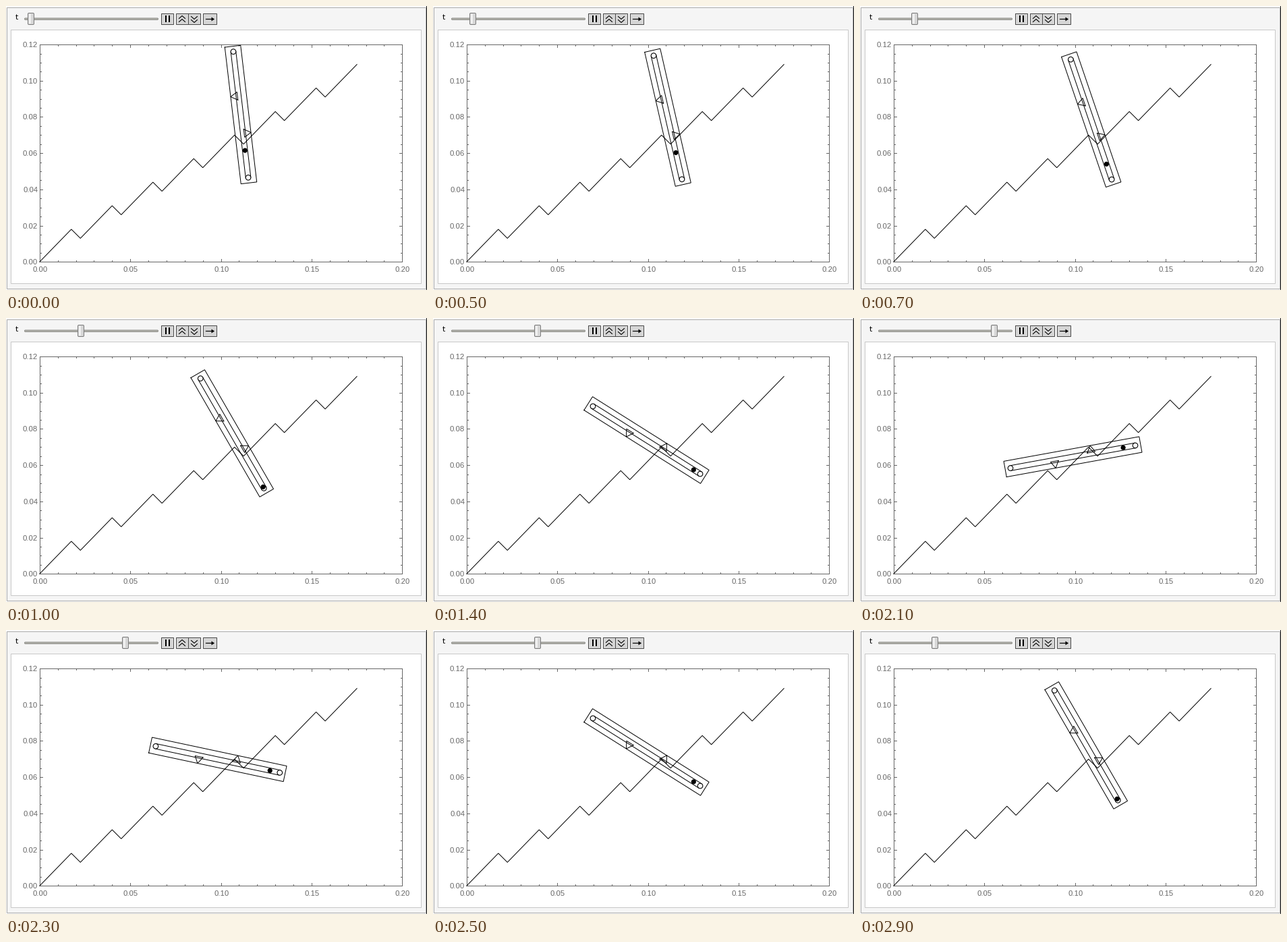
Write a matplotlib script that moves like this. It is 624 px wide and 421 px high and loops after 3 s.

```python
import numpy as np
import matplotlib.pyplot as plt
from matplotlib.animation import FuncAnimation
from matplotlib.patches import Circle, FancyBboxPatch, Polygon, Rectangle

W, H = 624, 421
PX = 0.72  # points per pixel at 100 dpi
GREY = "#666666"

fig = plt.figure(figsize=(W / 100, H / 100), dpi=100, facecolor="white")
ax = fig.add_axes([0, 0, 1, 1])
ax.set_xlim(0, W)
ax.set_ylim(H, 0)
ax.axis("off")


def line(x, y, color="black", width=1, z=3, **kw):
    return ax.plot(x, y, color=color, lw=width * PX, zorder=z,
                   solid_joinstyle="miter", **kw)[0]


def box(x0, y0, x1, y1, fill, edge, z=1):
    ax.add_patch(Rectangle((x0, y0), x1 - x0, y1 - y0, fc=fill, ec=edge,
                           lw=PX, zorder=z))


def rounded(x, y, w, h, r, fill, edge, z):
    patch = FancyBboxPatch((x, y), w, h, fc=fill, ec=edge, lw=PX, zorder=z,
                           boxstyle=f"round,pad=0,rounding_size={r}")
    return ax.add_patch(patch)


def label(x, y, text, ha, size=11.3, color=GREY, font="Liberation Sans"):
    ax.text(x, y, text, ha=ha, va="baseline", fontsize=size * PX,
            color=color, family=font, zorder=4)


def to_px(x, y):
    return 49.8 + 2687.5 * np.asarray(x), 379.3 - 2685 * np.asarray(y)


# Panels
box(1, 2, 622, 419, "#f5f5f5", "#a9a9a9")
line([623, 623], [-1, H + 1], "#202020")
box(7, 35, 615, 411, "white", "#c8c8c8")

# Slider track and buttons
label(13.5, 20.5, "t", "left", size=11, color="black", font="DejaVu Sans")
rounded(27.5, 18, 198, 2.4, 1.2, "#b4b4ac", "#8e8e8a", 2)
for x0, x1 in [(230, 248), (252, 288), (292, 312)]:
    box(x0, 11, x1, 27, "#d6d6d6", "#4a4a4a", 2)
line([270, 270], [11, 27], "#4a4a4a")
for x in (237, 242):
    line([x, x], [14, 24], width=2, solid_capstyle="butt")
for y in (18.5, 23.5):
    line([256.5, 261, 265.5], [y, y - 4, y], width=1.1)
    line([274.5, 279, 283.5], [y - 3, y + 1, y - 3], width=1.1)
line([296, 307], [19, 19], width=1.2)
ax.add_patch(Polygon([(304.5, 16.5), (309, 19.5), (304.5, 22.5)],
                     fc="black", ec="none", zorder=4))

# Plot frame, ticks and labels
box(50, 57, 587, 379, "none", GREY, 2)
for i in range(21):
    x = round(float(to_px(i * 0.01, 0)[0]))
    size = 4 if i % 5 == 0 else 2
    line([x, x], [379, 379 - size], GREY)
    line([x, x], [57, 57 + size], GREY)
    if i % 5 == 0:
        label(x + 0.4, 394.4, f"{i * 0.01:.2f}", "center")
for i in range(25):
    y = round(float(to_px(0, i * 0.005)[1]))
    size = 4 if i % 4 == 0 else 2
    line([50, 50 + size], [y, y], GREY)
    line([587, 587 - size], [y, y], GREY)
    if i % 4 == 0:
        label(47, y + 4, f"{i * 0.005:.2f}", "right")

# Saw-tooth ramp
teeth = np.array([(0.0225 * i + dx, 0.013 * i + dy) for i in range(8)
                  for dx, dy in ((0, 0), (0.0175, 0.018))])
line(*to_px(*teeth.T))

# Bar pose at a few slider steps: centre x, centre y, tilt from vertical
KNOTS = np.array([0, 3, 7, 10, 16, 22, 24])
POSES = np.array([
    (348, 161, 6.75), (348, 165.25, 12.9), (340.7, 169, 21.2),
    (335.25, 171, 30), (316.5, 181, 57.8), (315.5, 205.75, 100.3),
    (319, 216, 115)])
SLOPES = np.gradient(POSES, KNOTS, axis=0)


def pose(k):
    """Cubic Hermite interpolation between the known poses."""
    i = min(np.searchsorted(KNOTS, k, side="right") - 1, len(KNOTS) - 2)
    h = KNOTS[i + 1] - KNOTS[i]
    s = (k - KNOTS[i]) / h
    return ((1 + 2 * s) * (1 - s) ** 2 * POSES[i]
            + s * (1 - s) ** 2 * h * SLOPES[i]
            + s * s * (3 - 2 * s) * POSES[i + 1]
            + s * s * (s - 1) * h * SLOPES[i + 1])


def step(n):
    """Slider step: rises, turns at the top and comes back."""
    up = max(1.5 * n - 5, n - 2, 0)
    return int(np.ceil(min(up, 53.5 - 1.5 * n)))


# Bar outlines in its own (along, across) coordinates
END, RADIUS = 94, 3.8
tooth = np.array([(22, 1.7), (34, 1.7), (28, 11.9), (22, 1.7)])
SHAPES = [
    np.array([(-102, -11.8), (102, -11.8), (102, 11.8), (-102, 11.8),
              (-102, -11.8)]),
    np.array([(-END, RADIUS), (END, RADIUS)]),
    np.array([(-END, -RADIUS), (END, -RADIUS)]),
    tooth,
    -tooth,
]
outlines = [line([], [], z=5) for _ in SHAPES]
rings = [ax.add_patch(Circle((0, 0), RADIUS, fc="white", ec="black",
                             lw=1.1 * PX, zorder=6)) for _ in range(2)]
ball = ax.add_patch(Circle((0, 0), 3.6, fc="black", ec="none", zorder=7))
thumb = rounded(0, 10.5, 9, 17, 1.5, "#d6d6d6", "#7c7c7c", 6)
shine = ax.add_patch(Rectangle((0, 12), 3, 14, fc="#f0f0f0", ec="none",
                               zorder=7))


def draw(n):
    k = step(n)
    cx, cy, tilt = pose(k)
    a = np.radians(tilt)
    axes = np.array([(np.sin(a), np.cos(a)), (np.cos(a), -np.sin(a))])

    def place(points):
        return np.array([cx, cy]) + np.asarray(points) @ axes

    for art, shape in zip(outlines, SHAPES):
        art.set_data(*place(shape).T)
    for ring, side in zip(rings, (-END, END)):
        ring.center = place((side, 0))
    ball.center = place((np.interp(k, [3, 10, 16, 22, 24],
                                   [53.5, 91.7, 82.5, 75.8, 73.5]), 0))

    x = round(37.2 + 7.35 * k)
    thumb.set_x(x - 4.5)
    shine.set_x(x - 3)
    return [*outlines, *rings, ball, thumb, shine]


anim = FuncAnimation(fig, draw, frames=30, interval=100, repeat=True,
                     repeat_delay=0, blit=False)
plt.show()
```
